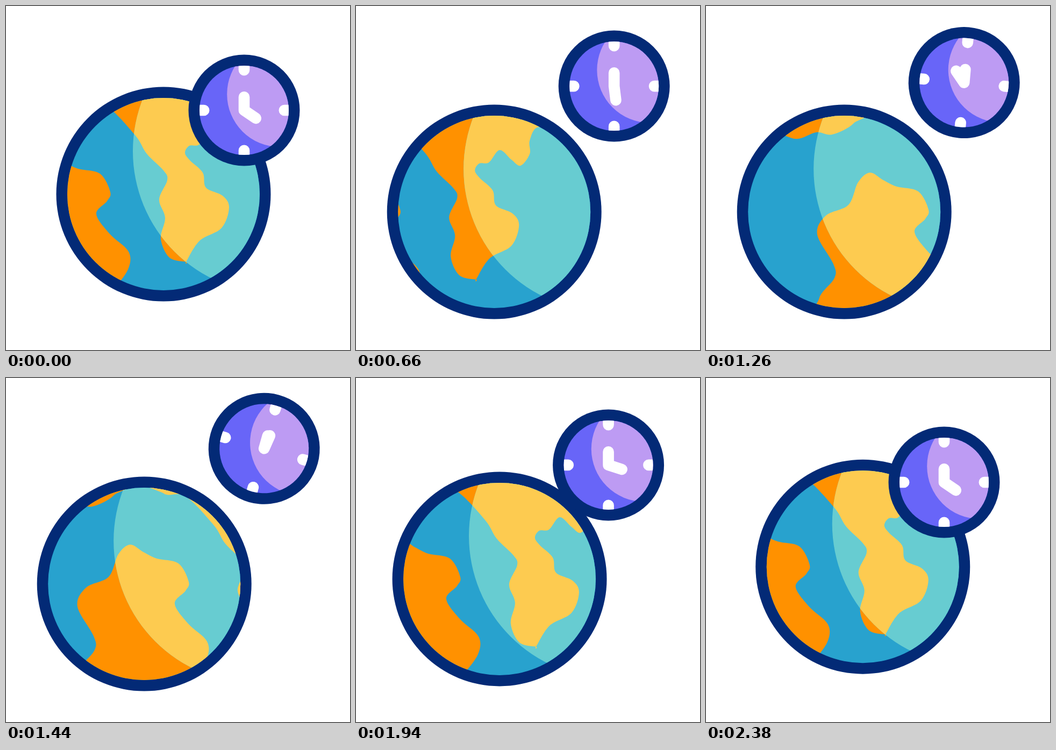
Write an HTML page with a canvas that moves like this. It is 640 by 640 pixels and loops after 2.4 s.

```html
<!DOCTYPE html>
<html lang="en">
<head>
<meta charset="utf-8">
<title>World time</title>
<style>
  html, body { margin: 0; width: 100%; height: 100%; overflow: hidden; background: #fff; }
  canvas { display: block; width: 100vmin; height: 100vmin; margin: auto; }
</style>
</head>
<body>
<canvas id="stage" width="640" height="640"></canvas>
<script>
const ctx = document.getElementById('stage').getContext('2d');
const LOOP = 2400;
const TURN = 563; // width of the repeating map
const NAVY = '#032a76';
const TAU = Math.PI * 2;

// Key points of each coast around the globe centre, joined by a smooth curve
const lands = [
  `-95,180 -66,140 -65,107 -100,74 -125,37 -105,13 -99,-4 -118,-38 -158,-47
   -183,-59 -208,-73 -230,-55 -248,-13 -290,7 -306,42 -276,97 -274,123
   -302,160 -296,200 -115,205`,
  `-165,-205 -145,-168 -105,-163 -53,-110 -31,-75 0,-44 7,-26 -8,10 3,44 -5,83
   11,118 42,126 42,126 67,87 108,63 122,25 110,3 79,-12 73,-40 49,-63 40,-77
   48,-90 66,-92 86,-115 108,-97 125,-86 142,-108 142,-133 160,-158 215,-136
   255,-148 285,-144 325,-165 345,-205`
].map(smooth);

function smooth(text) {
  const points = text.split(/\s+/).map(p => p.split(',').map(Number));
  const at = i => points[(i + points.length) % points.length];
  const path = new Path2D();
  path.moveTo(...at(0));
  points.forEach((b, i) => {
    const a = at(i - 1), c = at(i + 1), d = at(i + 2);
    path.bezierCurveTo(
      b[0] + (c[0] - a[0]) / 6, b[1] + (c[1] - a[1]) / 6,
      c[0] - (d[0] - b[0]) / 6, c[1] - (d[1] - b[1]) / 6, ...c);
  });
  return path;
}

const clamp = (v, lo, hi) => Math.min(hi, Math.max(lo, v));
const mix = (a, b, k) => a + (b - a) * k;

function ease(t, from, to) {
  const u = clamp((t - from) / (to - from), 0, 1);
  return u * u * (3 - 2 * u);
}

// Phase of a motion that runs whole cycles between two times, in radians
function cycles(t, from, to, count) {
  return clamp((t - from) / (to - from), 0, 1) * count * TAU;
}

function disc(x, y, r, color) {
  ctx.beginPath();
  ctx.arc(x, y, r, 0, TAU);
  ctx.fillStyle = color;
  ctx.fill();
}

// Dark rim, then clip to the face inside it
function face(rim, r) {
  disc(0, 0, rim, NAVY);
  ctx.beginPath();
  ctx.arc(0, 0, r, 0, TAU);
  ctx.clip();
}

function map(land, shift) {
  ctx.fillStyle = land;
  for (const x of [-shift, TURN - shift]) {
    ctx.save();
    ctx.translate(x, 0);
    lands.forEach(path => ctx.fill(path));
    ctx.restore();
  }
}

function globe(x, y, shift) {
  ctx.save();
  ctx.translate(x, y);
  face(199.5, 179);
  disc(0, 0, 185, '#28a2ce');
  map('#ff9100', shift);
  disc(207.6, -80, 264.6, '#67ccd1');
  ctx.clip();
  map('#fdcb50', shift);
  ctx.restore();
}

function clock(x, y, tilt, hour) {
  ctx.save();
  ctx.translate(x, y);
  ctx.rotate(tilt);
  face(103.5, 83);
  disc(0, 0, 90, '#6865f8');
  disc(66.4, -30, 98.2, '#bd9bf3');

  ctx.strokeStyle = '#fff';
  ctx.lineWidth = 20.6;
  ctx.lineCap = ctx.lineJoin = 'round';
  ctx.beginPath();
  for (let i = 0; i < 4; i++) {
    ctx.moveTo(0, -95);
    ctx.lineTo(0, -74.8);
    ctx.rotate(TAU / 4);
  }
  ctx.moveTo(0, -24.7);
  ctx.lineTo(0, 0);
  ctx.lineTo(26.3 * Math.sin(hour), -26.3 * Math.cos(hour));
  ctx.stroke();
  ctx.restore();
}

function draw(t) {
  const out = ease(t, 200, 657);
  const back = ease(t, 1800, 2200);
  const spin = ease(t, 200, 2200);
  const hop = 9.25 * (1 - Math.cos(cycles(t, 660, 1660, 2)));
  const tilt = 0.35 * Math.sin(cycles(t, 668, 1808, 2));

  ctx.fillStyle = '#fff';
  ctx.fillRect(0, 0, 640, 640);

  const drift = out - 0.965 * back; // the globe settles just short of its start
  globe(mix(293, 257.2, drift), mix(350, 383, drift), spin * TURN);

  const apart = out - back;
  clock(mix(443, 480.2, apart), mix(194, 149.1, apart) - hop, tilt, 2.17 + TAU * spin);
}

const start = performance.now();
function tick() {
  draw((performance.now() - start) % LOOP);
  requestAnimationFrame(tick);
}
tick();
</script>
</body>
</html>
```
